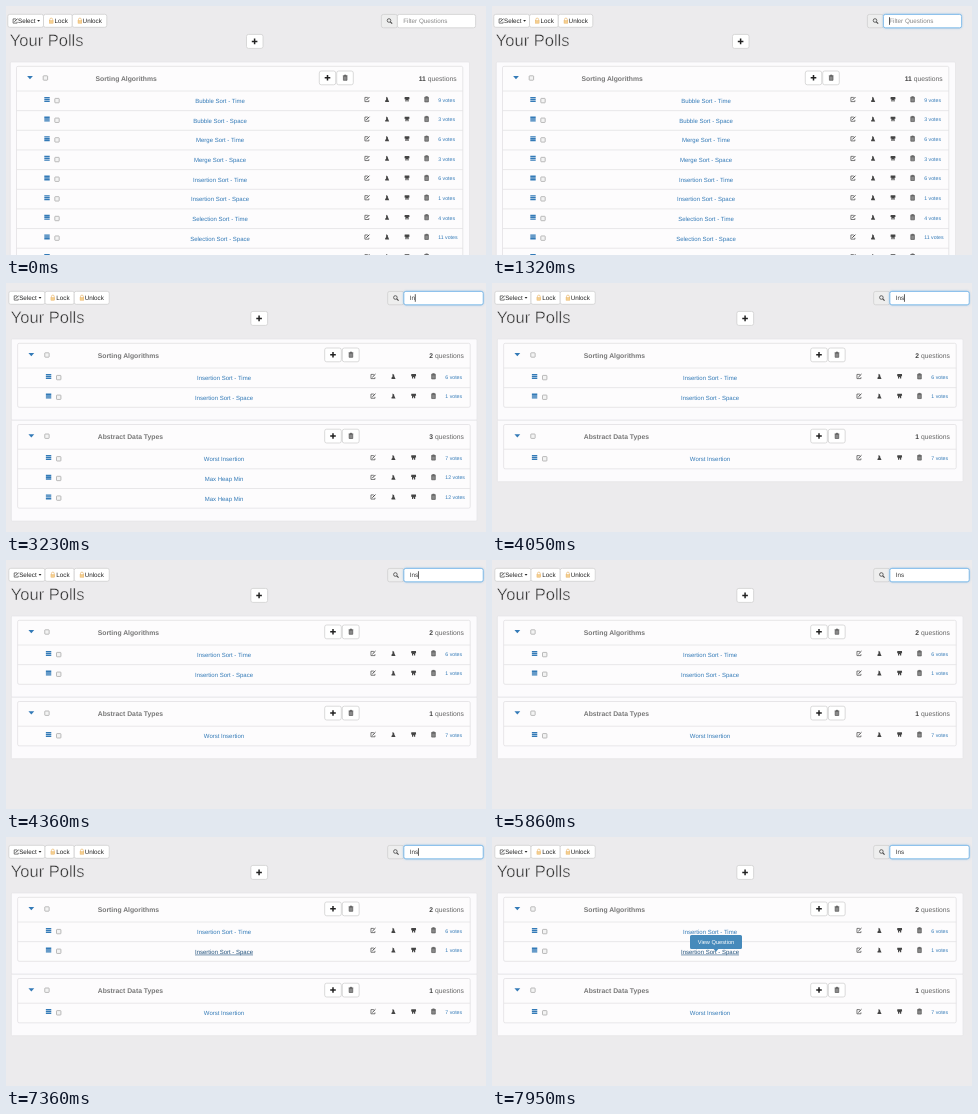
Animation of 480x249 px, one loop 8000 ms. Source, as an HTML page:

```html
<!DOCTYPE html>
<html lang="en">
<head>
<meta charset="utf-8">
<title>Your Polls</title>
<style>
html, body { margin: 0; width: 100%; height: 100%; overflow: hidden; background: #ecebed; }
svg { display: block; width: 480px; height: 249px; }
text { font-family: "Liberation Sans", Arial, sans-serif; text-rendering: geometricPrecision; white-space: pre; }
/* a stroke in the page colour thins the letters */
.title { font-size: 16.5px; fill: #2a2a2a; stroke: #ecebed; stroke-width: .45; }
.nav { font-size: 6.3px; fill: #222; }
.input { font-size: 6.3px; fill: #3c3c3c; }
.hint { font-size: 6.3px; fill: #888; }
.head { font-size: 6.8px; font-weight: bold; fill: #777; }
.count { font-size: 6.75px; fill: #666; }
.count tspan { font-weight: bold; fill: #444; }
.link { font-size: 6px; fill: #337ab7; text-anchor: middle; }
.link.hover { fill: #23527c; text-decoration: underline; }
.votes { font-size: 5.2px; fill: #337ab7; }
.tip { font-size: 5.7px; fill: #fff; text-anchor: middle; }
.glow { fill: #fff; stroke: #73b5ea; stroke-width: .8; filter: drop-shadow(0 0 1.2px rgba(102, 175, 233, .6)); }
</style>
</head>
<body>
<svg id="stage" viewBox="0 0 480 249">
  <defs>
    <g id="plus"><path d="M-2.8 0H2.8M0-2.8V2.8" stroke="#222" stroke-width="1.5"/></g>
    <g id="trash" fill="#8a8a8a" stroke="#555" stroke-width=".7">
      <path d="M-2.4-2H2.4M-.9-2V-2.7H.9V-2M-1.8-1.5V2.5H1.8V-1.5Z"/>
    </g>
    <g id="edit" fill="none" stroke="#444">
      <path d="M.8-2H-2.1V2.2H1.9V.8" stroke-width=".7"/>
      <path d="M-.7.8L2.4-2.3" stroke-width="1"/>
    </g>
    <path id="fire" fill="#444" d="M-.8-2.6L.8-1.6L.9-.4L2.2 2.5H-1.8L-1.9 1.4L-.9.4Z"/>
    <path id="shop" fill="#444" d="M-2.3-2.4H2.3L2.5-.2H1.6V2.2H.4V.6H-.4V2.2H-1.6V-.2H-2.5Z"/>
    <g id="list" stroke="#337ab7">
      <path d="M-2.7-1.8H2.7M-2.7 0H2.7M-2.7 1.8H2.7" stroke-width="1.4"/>
    </g>
    <rect id="check" x="-2.2" y="-2.2" width="4.4" height="4.4" rx=".6" fill="#f3f3f3" stroke="#a0a0a0" stroke-width=".7"/>
    <g id="lock" fill="none" stroke="#e5ab58">
      <path d="M-1.4-.3V-1.3A1.4 1.4 0 0 1 1.4-1.3V-.3" stroke-width=".6"/>
      <rect x="-1.9" y="-.2" width="3.8" height="2.6" fill="#f4cf8f" stroke-width=".4"/>
    </g>
    <g id="lens" fill="none" stroke="#444">
      <circle cx="-.6" cy="-.6" r="1.8" stroke-width=".8"/>
      <path d="M.7.7L2.6 2.6" stroke-width="1.1"/>
    </g>
  </defs>
  <g id="page"></g>
  <rect id="caret" y="11.2" width=".8" height="7.6" fill="#333"/>
  <g id="tip">
    <path fill="#468abb" d="M199.5 98H248.5Q250 98 250 99.5V110.5Q250 112 248.5 112H226.4L224 114.6L221.6 112H199.5Q198 112 198 110.5V99.5Q198 98 199.5 98Z"/>
    <text class="tip" x="224" y="107.2">View Question</text>
  </g>
</svg>
<script>
const LOOP = 8000, VIEW_H = 249;
const TOP = 56, HEAD_H = 29, ROW_H = 19.65, FOOT_H = 12.9;
const INPUT_X = 397.2;

const groups = [
  { name: "Sorting Algorithms", polls: [
    ["Bubble Sort - Time", 9], ["Bubble Sort - Space", 3],
    ["Merge Sort - Time", 6], ["Merge Sort - Space", 3],
    ["Insertion Sort - Time", 6], ["Insertion Sort - Space", 1],
    ["Selection Sort - Time", 4], ["Selection Sort - Space", 11],
    ["Quick Sort - Time Sorted", 10], ["Quick Sort - Time Unsorted", 5],
    ["Quick Sort - Space", 4]] },
  { name: "Abstract Data Types", polls: [
    ["Worst Insertion", 7], ["Max Heap Min", 12], ["Max Heap Min", 12]] }
];

// [start ms, value]; the last entry reached is in force
const typing = [[0, ""], [2500, "I"], [3230, "In"], [3910, "Ins"]];
const caretOn = [[0, 0], [1050, 1], [1550, 0], [2090, 1], [3000, 0], [3230, 1],
  [4860, 0], [5360, 1], [5860, 0], [6360, 1], [6860, 0], [7360, 1], [7860, 0]];
const hovers = [[0, ""], [6450, "Insertion Sort - Time"], [7070, ""], [7320, "Insertion Sort - Space"]];

const $ = id => document.getElementById(id);
const at = (steps, t) => steps.filter(s => s[0] <= t).pop()[1];
const ramp = (t, from, to) => Math.min(1, Math.max(0, (t - from) / (to - from)));

let wide = false;
// without a scrollbar the page spreads out a little
const X = x => wide ? x * 1.014 + 1 : x;

const box = (x0, y, x1, h, fill, stroke, r = 2) =>
  `<rect x="${X(x0)}" y="${y}" width="${X(x1) - X(x0)}" height="${h}" rx="${r}" fill="${fill}" stroke="${stroke}" stroke-width=".7"/>`;
const button = (x0, y, x1, h) => box(x0, y, x1, h, "#fff", "#ccc");
const icon = (name, x, y) => `<use href="#${name}" transform="translate(${X(x)} ${y})"/>`;
const text = (cls, x, y, s) => `<text class="${cls}" x="${X(x)}" y="${y}">${s}</text>`;
const rule = (x0, x1, y) => `<path d="M${X(x0)} ${y}H${X(x1)}" stroke="#e4e2e5" stroke-width=".8"/>`;

function toolbar(query) {
  const arrow = X(31.2);
  return button(1.8, 8.3, 37.5, 13) + button(37.5, 8.3, 66.3, 13) + button(66.3, 8.3, 100.8, 13) +
    icon("edit", 9.2, 14.9) + text("nav", 12, 17, "Select") +
    `<path d="M${arrow} 14.1h2.8l-1.4 1.7z" fill="#222"/>` +
    icon("lock", 45.2, 14.8) + text("nav", 48.6, 17, "Lock") +
    icon("lock", 73.9, 14.8) + text("nav", 76.6, 17, "Unlock") +
    text("title", 3.8, 39.5, "Your Polls") +
    button(240.5, 28.4, 257, 14) + icon("plus", 248.6, 35.4) +
    box(375.4, 8.4, 391.4, 13.4, "#eee", "#ccc") + icon("lens", 383.6, 15.1) +
    box(391.4, 8.4, 469.6, 13.4, "#fff", "#ccc") +
    `<rect id="glow" class="glow" x="${X(391.4)}" y="8.4" width="${X(469.6) - X(391.4)}" height="13.4" rx="2"/>` +
    text(query ? "input" : "hint", INPUT_X, 17.3, query || "Filter Questions");
}

function row([name, votes], y) {
  return rule(10.5, 457, y) + icon("list", 41, y + 8.4) + icon("check", 51, y + 9.6) +
    `<text class="link" data-name="${name}" x="${X(214)}" y="${y + 12}">${name}</text>` +
    ["edit", "fire", "shop", "trash"].map((n, i) => icon(n, [361, 381, 401, 420.6][i], y + 8.4)).join("") +
    text("votes", 432.3, y + 10.6, votes + " votes");
}

function panel({ name, polls }, y) {
  const h = HEAD_H + polls.length * ROW_H;
  const mark = X(24);
  return box(4.3, y, 463.5, h + FOOT_H, "#fcfbfd", "#e4e3e5", 1) +
    box(10.5, y + 4.3, 456.8, h - 4.3, "#fdfcfd", "#dfdde0", 1.5) +
    `<path d="M${mark - 2.9} ${y + 14}h5.8l-2.9 3.3z" fill="#337ab7"/>` +
    icon("check", 39.4, y + 16) + text("head", 89.5, y + 18.8, name) +
    button(313.3, y + 9, 329.7, 13.8) + button(330.7, y + 9, 347.3, 13.8) +
    icon("plus", 321.5, y + 15.8) + icon("trash", 339.2, y + 15.8) +
    `<text class="count" text-anchor="end" x="${X(450.6)}" y="${y + 18.8}"><tspan>${polls.length}</tspan> questions</text>` +
    polls.map((p, i) => row(p, y + HEAD_H + i * ROW_H)).join("");
}

function build(query) {
  const key = query.toLowerCase();
  const shown = groups.map(g => ({ name: g.name, polls: g.polls.filter(p => p[0].toLowerCase().includes(key)) }));
  const size = g => HEAD_H + g.polls.length * ROW_H + FOOT_H;
  wide = TOP + shown.reduce((sum, g) => sum + size(g), 0) < VIEW_H;
  let y = TOP;
  $("page").innerHTML = toolbar(query) + shown.map(g => {
    const part = panel(g, y);
    y += size(g);
    return part;
  }).join("");
  const typed = document.querySelector(".input");
  $("caret").setAttribute("x", X(INPUT_X) + (typed ? typed.getComputedTextLength() : 0) - .2);
}

let current = null;
function draw(now) {
  const t = now % LOOP;
  const query = at(typing, t);
  if (query !== current) build(current = query);
  const hover = at(hovers, t);
  document.querySelectorAll(".link").forEach(el => el.classList.toggle("hover", el.dataset.name === hover));
  $("glow").style.opacity = ramp(t, 1050, 1200);
  $("caret").style.opacity = at(caretOn, t);
  $("tip").style.opacity = ramp(t, 7880, 7950);
}

const start = performance.now();
function tick() {
  draw(performance.now() - start);
  requestAnimationFrame(tick);
}
tick();
</script>
</body>
</html>
```
